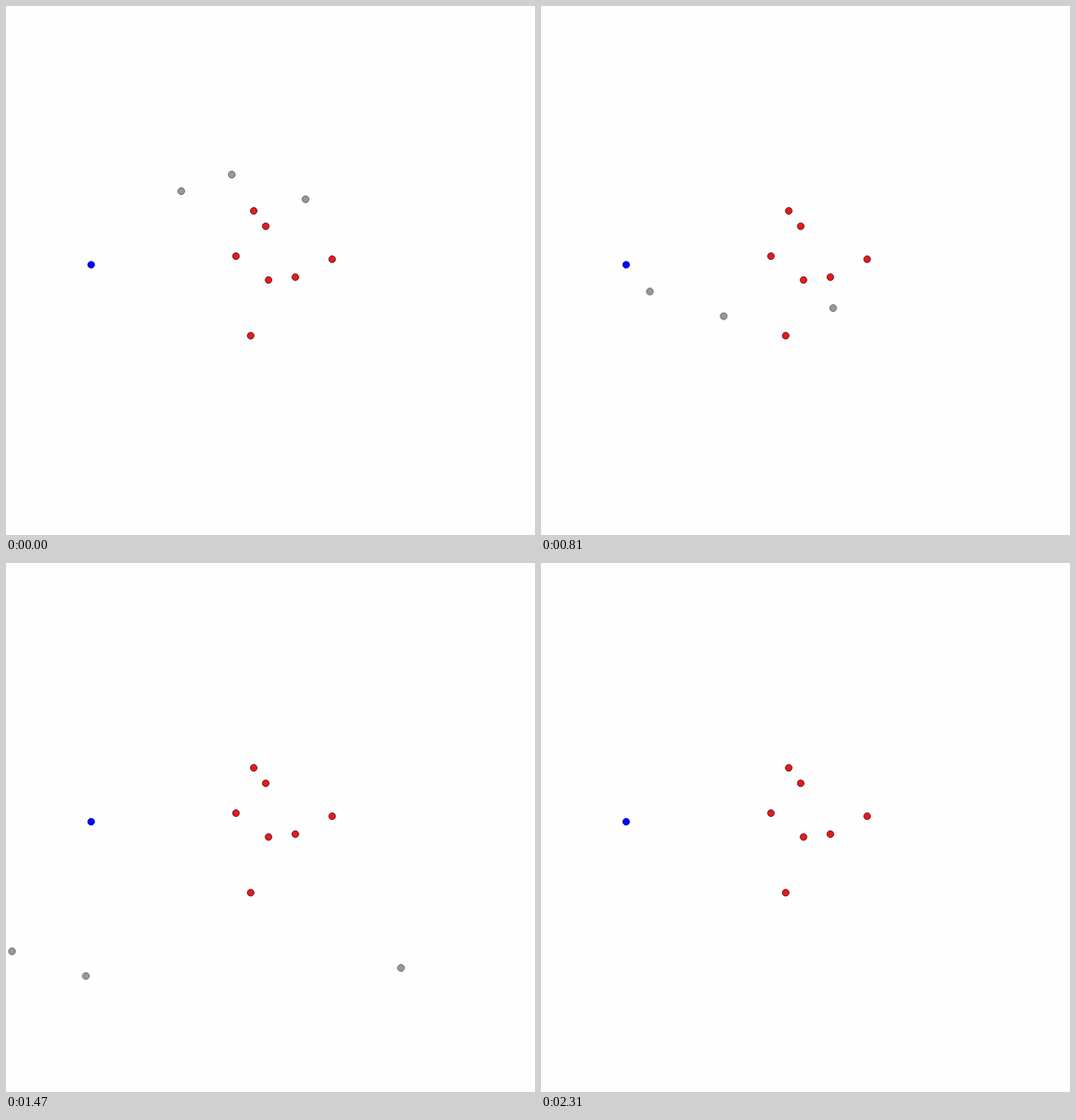
An HTML page for the animation above (9000 ms loop, 700 by 700 pixels).

```html
<!DOCTYPE html>
<html lang="en">
<head>
<meta charset="utf-8">
<title>Drifting dots</title>
<style>
  html, body { margin: 0; width: 100%; height: 100%; overflow: hidden; background: #fefefe; }
  svg { display: block; width: 100vw; height: 100vh; }
  circle { r: 4.5px; stroke-width: 1; }
  .gray { fill: #999; stroke: #555; }
  .red { fill: #e41a1c; stroke: #58191a; }
  .blue { fill: #00f; stroke: #0000b4; }

  /* Short rest, then a constant 45 degree drift in 30 ms steps until off stage. */
  .gray circle { animation: drift 9s -1ms infinite; }
  .right { --dx: 463.9px; }
  .left { --dx: -463.9px; }
  @keyframes drift {
    0% { transform: none; }
    0.66667% { transform: none; animation-timing-function: steps(75, jump-end); }
    25.66667%, 100% { transform: translate(var(--dx), 463.9px); }
  }
</style>
</head>
<body>
<svg viewBox="0 0 700 700">
  <g class="gray">
    <circle class="right" cx="231.9" cy="245.1"/>
    <circle class="left" cx="298.7" cy="223.1"/>
    <circle class="left" cx="396.4" cy="255.8"/>
  </g>
  <g class="red">
    <circle cx="327.8" cy="271.1"/>
    <circle cx="343.7" cy="291.5"/>
    <circle cx="304.3" cy="331"/>
    <circle cx="431.6" cy="335.1"/>
    <circle cx="347.4" cy="362.6"/>
    <circle cx="382.9" cy="358.8"/>
    <circle cx="323.8" cy="436.3"/>
  </g>
  <circle class="blue" cx="112.7" cy="342.4"/>
</svg>
</body>
</html>
```
